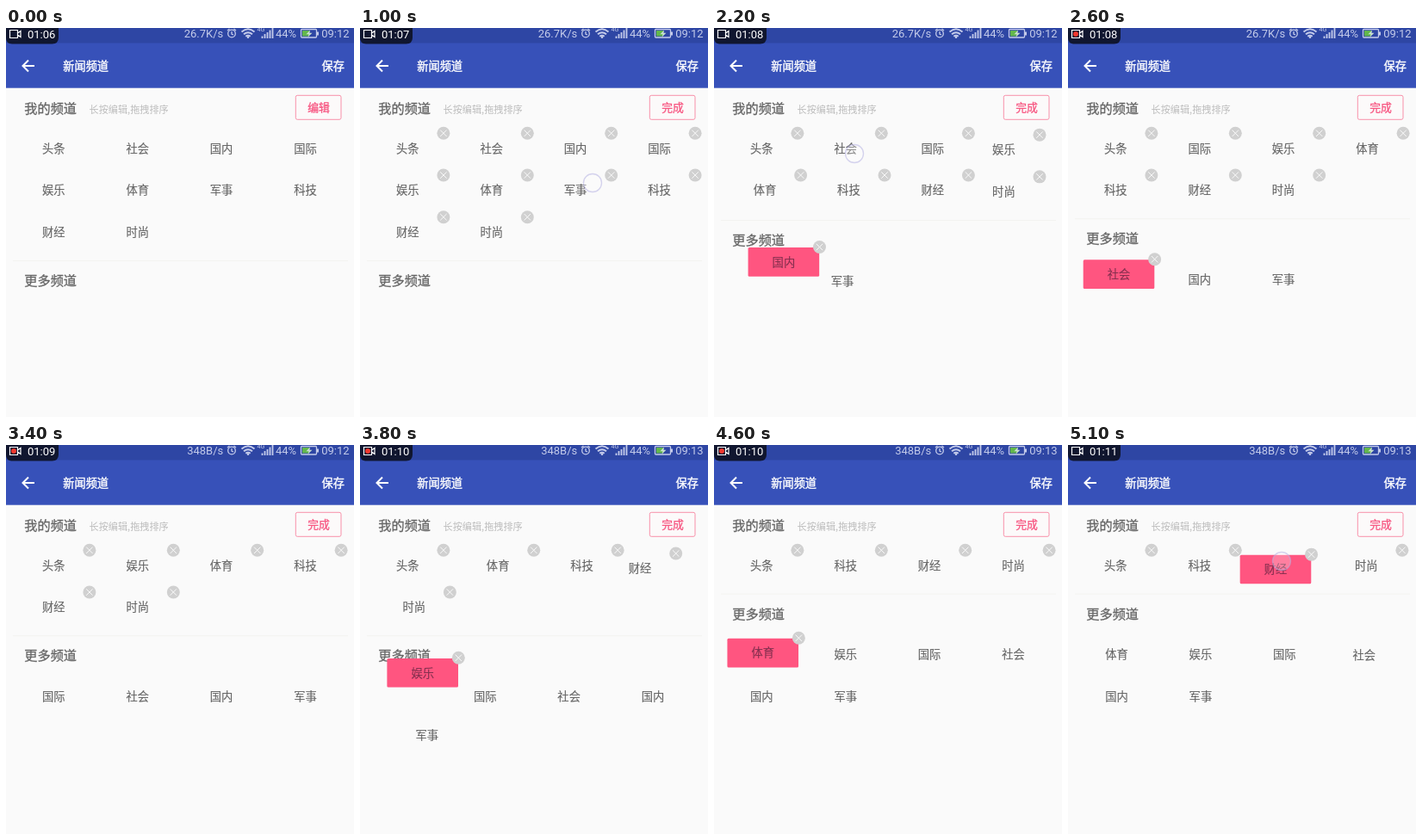
These frames come from a looping animation (404 px wide and 452 px high, 5200 ms). An HTML page:

```html
<!DOCTYPE html>
<html lang="zh">
<head>
<meta charset="utf-8">
<title>新闻频道</title>
<style>
html, body { margin: 0; width: 100%; height: 100%; overflow: hidden; background: #fafafa; }
svg { display: block; width: 404px; height: 452px; font-family: "Noto Sans CJK SC", "Noto Sans CJK", "Noto Sans", sans-serif; }
.status { font: 13px Roboto, sans-serif; fill: #c4cbea; }
.item { font-size: 13.3px; fill: #666; stroke: #666; stroke-width: .15; text-anchor: middle; }
.head { font-size: 15.2px; fill: #666; stroke: #666; stroke-width: .3; }
.bar { font-size: 13.2px; fill: #fff; stroke: #fff; stroke-width: .4; }
.line { fill: none; stroke: #c4cbea; stroke-width: 1.3; }
</style>
</head>
<body>
<svg id="stage" viewBox="0 0 404 452">
  <rect width="404" height="452" fill="#fafafa"/>
  <rect width="404" height="69.700" fill="#3751b9"/>
  <rect width="404" height="17.500" fill="#2e46a4"/>

  <path d="M0 0H61V11Q61 18.500 53.500 18.500H7Q0 18.500 0 11Z" fill="#10162f"/>
  <path d="M4.500 2.500H13.500V11.500H4.500ZM13.500 6L17 3.500V10.500L13.500 8" fill="none" stroke="#fff" stroke-width="1.200"/>
  <circle id="rec" cx="9" cy="7" r="3" fill="#f0382e"/>
  <text id="timer" class="status" x="25" y="11.500" style="fill:#fff"></text>

  <text id="speed" class="status" x="252.300" y="11" text-anchor="end"></text>
  <g class="line">
    <circle cx="262" cy="6.500" r="4.300"/>
    <path d="M262 4V7L264 8M257 3L259.500 1M267 3L264.500 1"/>
    <path d="M273.500 4.500Q281 -2 288.500 4.500M276 7.300Q281 3 286 7.300M278.300 9.800Q281 7.500 283.700 9.800" stroke-width="1.900"/>
    <path d="M297.500 12V9.500M300.500 12V7M303.500 12V5M306.500 12V2.500M309.500 12V0" stroke-width="1.800"/>
    <rect x="342.500" y="1.500" width="18" height="9.500" rx="1"/>
    <path d="M362 4.500V8.500" stroke-width="2"/>
  </g>
  <circle cx="281" cy="10.700" r="1.300" fill="#c4cbea"/>
  <rect x="344" y="3" width="8" height="6.500" fill="#62b74c"/>
  <path d="M353 2.500L348.500 7.200H351.500L350.500 10.500L355.500 5.800H352.500Z" fill="#c9dfd0"/>
  <text class="status" x="291.500" y="3.500" style="font-size:7px">4G</text>
  <text class="status" x="313" y="11">44%</text>
  <text id="clock" class="status" x="398.500" y="11" text-anchor="end"></text>

  <path d="M33 44H19.500M26 37.500L19.500 44L26 50.500" fill="none" stroke="#fff" stroke-width="2"/>
  <text class="bar" x="66.300" y="48.700">新闻频道</text>
  <text class="bar" x="366.500" y="48.700">保存</text>

  <text class="head" x="21.300" y="98.500">我的频道</text>
  <text x="96.500" y="99" font-size="11.150" fill="#bcbcbc">长按编辑,拖拽排序</text>
  <rect x="336.300" y="78.300" width="52.700" height="28" rx="2" fill="#fcfafa" stroke="#f890a9"/>
  <text id="button" x="363" y="97" font-size="12.800" fill="#f75580" stroke="#f75580" stroke-width=".3" text-anchor="middle"></text>

  <g id="more">
    <path d="M8 0.500H397" stroke="#f3f3f0"/>
    <text class="head" x="21.300" y="29">更多频道</text>
  </g>
  <g id="items"></g>
  <circle id="touch" r="10.500" fill="#fff" fill-opacity=".25" stroke="#b4b0e2" stroke-opacity=".55" stroke-width="1.300"/>
</svg>
<script>
const LOOP = 5200, STEP = 100, EDIT_AT = 350;
const FLY = 360, SHIFT_DELAY = 30, SHIFT = 280;
const names = ["头条", "社会", "国内", "国际", "娱乐", "体育", "军事", "科技", "财经", "时尚"];
// Each tapped channel flies to the front of the lower list.
const moves = [
  { name: "军事", at: 1290, lead: 300, x: 270, y: 180 },
  { name: "国内", at: 1925, lead: 110, x: 262, y: 146 },
  { name: "社会", at: 2285, lead: 100, x: 163, y: 146 },
  { name: "国际", at: 2850, lead: 130, x: 163, y: 146 },
  { name: "娱乐", at: 3540, lead: 130, x: 162, y: 147 },
  { name: "体育", at: 4268, lead: 130, x: 161, y: 147 },
  { name: "财经", at: 5050, lead: 130, x: 248, y: 135 }
];
const touches = [{ from: 100, to: 450, x: 362, y: 95 }].concat(
  moves.map(m => ({ from: m.at - m.lead, to: m.at + 60, x: m.x, y: m.y })));
const ticks = [600, 1700, 2700, 3700, 4700];

const $ = id => document.getElementById(id);
const show = (el, on) => el.setAttribute("visibility", on ? "inherit" : "hidden");
const place = (el, x, y) => el.setAttribute("transform", `translate(${x.toFixed(2)} ${y.toFixed(2)})`);
const mix = (a, b, p) => a + (b - a) * p;
const ease = p => (1 - Math.cos(Math.PI * Math.min(1, Math.max(0, p)))) / 2;

function layout(mine, others) {
  const top = 270 - 48.7 * (3 - Math.ceil(mine.length / 4));
  const pos = {};
  const fill = (list, y) => list.forEach((n, i) => {
    pos[n] = { x: 55.3 + 97.4 * (i % 4), y: y + 48.7 * Math.floor(i / 4) };
  });
  fill(mine, 139.8);
  fill(others, top + 70.7);
  return { mine, others, top, pos };
}

const states = [layout(names, [])];
for (const m of moves) {
  const s = states[states.length - 1];
  states.push(layout(s.mine.filter(n => n !== m.name), [m.name, ...s.others]));
}

const items = {};
for (const n of names) {
  const g = document.createElementNS("http://www.w3.org/2000/svg", "g");
  g.innerHTML = `<rect x="-41.3" y="-16.9" width="82.6" height="33.6" rx="1.5" fill="#ff5580"/>
    <text class="item" y="4.7">${n}</text>
    <g transform="translate(41.6 -17.5)"><circle r="7.5" fill="#d0d0d0"/>
    <path d="M-3.700 -3.700L3.700 3.700M3.700 -3.700L-3.700 3.700" stroke="#fafafa"/></g>`;
  $("items").append(g);
  const [box, text, cross] = g.children;
  items[n] = { g, box, text, cross };
}

function draw(t) {
  const k = moves.filter(m => m.at <= t).length;
  const move = moves[k - 1], now = states[k], old = states[Math.max(0, k - 1)];
  const age = move ? t - move.at : LOOP;
  const shift = ease((age - SHIFT_DELAY) / SHIFT);
  const editing = t >= EDIT_AT;

  for (const n of names) {
    const it = items[n], a = old.pos[n], b = now.pos[n];
    const active = move && move.name === n;
    const flying = active && age < FLY;
    const p = active ? ease(age / FLY) : shift;
    place(it.g, mix(a.x, b.x, p), mix(a.y, b.y, p));
    show(it.box, flying);
    show(it.cross, editing && (flying || now.mine.includes(n)));
    const ink = flying ? "#85304f" : active && age < 530 ? "#858585" : "#666";
    it.text.style.fill = it.text.style.stroke = ink;
    if (flying && it.g.nextSibling) $("items").append(it.g);
  }
  place($("more"), 0, mix(old.top, now.top, shift));

  const touch = touches.find(c => t >= c.from && t < c.to);
  show($("touch"), touch);
  if (touch) place($("touch"), touch.x, touch.y);

  $("button").textContent = editing ? "完成" : "编辑";
  $("timer").textContent = "01:" + String(6 + ticks.filter(s => s <= t).length).padStart(2, "0");
  $("speed").textContent = t < 2800 ? "26.7K/s" : "348B/s";
  $("clock").textContent = t < 3700 ? "09:12" : "09:13";
  show($("rec"), t >= 200 && (t - 200) % 1010 < 595);
}

function frame() {
  const t = performance.now() % LOOP;
  draw(Math.floor(t / STEP) * STEP);
  requestAnimationFrame(frame);
}
frame();
</script>
</body>
</html>
```
